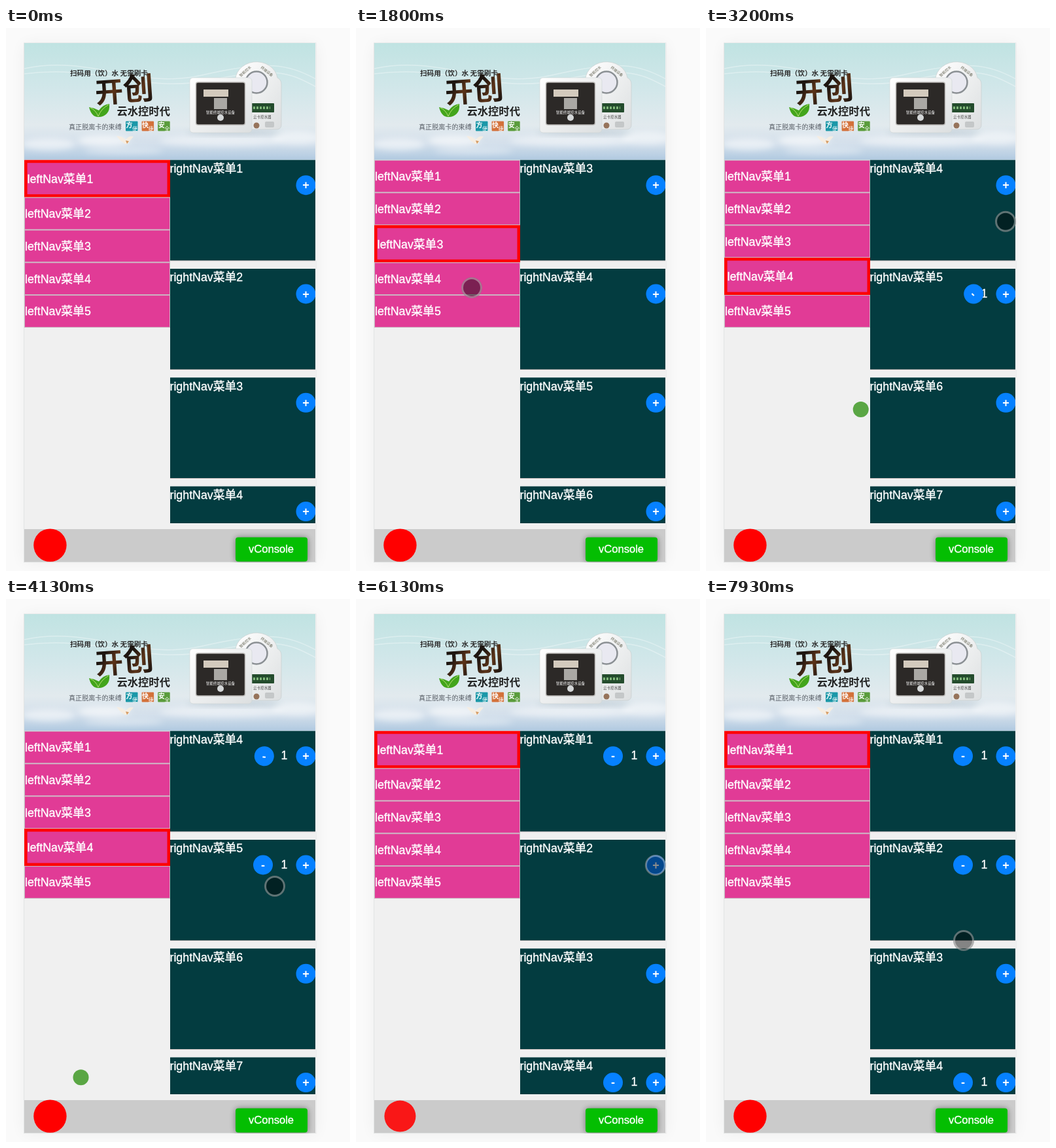
These frames come from a looping animation (526x830 px, 8000 ms). An HTML page:

```html
<!DOCTYPE html>
<html lang="zh-CN">
<head>
<meta charset="utf-8">
<title>Linked menu and cart</title>
<style>
html, body { margin: 0; width: 100%; height: 100%; overflow: hidden; background: #fafafa; }
svg { display: block; width: 526px; height: 830px; }
text { font-family: "Liberation Sans", "Noto Sans CJK SC", sans-serif; font-size: 17.8px; fill: #fff; }
.ui text { stroke: #fff; stroke-width: .35px; }
.ui .sign { font-weight: 700; font-size: 18px; stroke: none; }
.mid, .sign { text-anchor: middle; }
.ad text { font-family: "Noto Sans CJK SC", sans-serif; }
</style>
</head>
<body>
<svg viewBox="0 0 526 830">
  <defs>
    <linearGradient id="sky" x2="0" y2="1">
      <stop offset="0" stop-color="#c0e3e2"/>
      <stop offset=".4" stop-color="#d2e7ea"/>
      <stop offset=".7" stop-color="#e2eaee"/>
      <stop offset=".86" stop-color="#d3dfeb"/>
      <stop offset="1" stop-color="#b0c9e0"/>
    </linearGradient>
    <linearGradient id="ink" x2="1" y2="1">
      <stop offset=".35" stop-color="#1d1510"/>
      <stop offset=".6" stop-color="#5c3419"/>
      <stop offset=".85" stop-color="#1d1510"/>
    </linearGradient>
    <linearGradient id="shell" x2="1" y2="1">
      <stop offset="0" stop-color="#fff"/>
      <stop offset="1" stop-color="#dcdfe0"/>
    </linearGradient>
    <filter id="soft" x="-50%" y="-50%" width="200%" height="200%"><feGaussianBlur stdDeviation="5"/></filter>
    <filter id="halo" x="-20%" y="-20%" width="140%" height="140%"><feGaussianBlur stdDeviation="12"/></filter>
    <clipPath id="phone"><rect x="28" y="23" width="445" height="794"/></clipPath>
    <clipPath id="banner"><rect x="28" y="23" width="445" height="178.5"/></clipPath>
    <clipPath id="list"><rect x="251" y="201" width="222" height="556"/></clipPath>
  </defs>

  <rect width="526" height="830" fill="#fafafa"/>
  <rect x="28" y="25" width="446" height="792" fill="#000" opacity=".05" filter="url(#halo)"/>
  <rect x="27" y="22.5" width="447.5" height="794.5" fill="#e2e4e4"/>
  <rect x="28" y="23" width="446" height="793" fill="#f0f0f0"/>

  <g class="ad" clip-path="url(#banner)">
    <rect x="28" y="23" width="446" height="179" fill="url(#sky)"/>
    <g fill="none" stroke="#fff" stroke-width="1.5" opacity=".35">
      <path d="M28 62C130 40 200 95 300 72S430 55 474 78"/>
      <path d="M28 70C140 55 210 100 310 80S430 66 474 90"/>
    </g>
    <g fill="#fff" filter="url(#soft)">
      <ellipse cx="65" cy="178" rx="40" ry="9" opacity=".5"/>
      <ellipse cx="150" cy="172" rx="40" ry="8" opacity=".6"/>
      <ellipse cx="180" cy="188" rx="60" ry="6" opacity=".35"/>
      <ellipse cx="330" cy="172" rx="95" ry="9" opacity=".45"/>
      <ellipse cx="445" cy="168" rx="38" ry="10" opacity=".5"/>
    </g>
    <path d="M169 165q9 0 14 6q5-7 12-5q-5 5-8 10q-5 3-8-1q-5-3-10-10z" fill="#f5ede2"/>
    <path d="M183 172l5 1l-3 4z" fill="#d59a62"/>

    <text x="98" y="73" style="font-size:10.6px;font-weight:600;fill:#2b2b2b">扫码用（饮）水 无需刷卡</text>
    <g transform="rotate(-4 181 95)" style="font-weight:700">
      <text x="136" y="112" style="font-size:43px;fill:url(#ink)">开</text>
      <text x="179" y="111" style="font-size:47px;fill:url(#ink)">创</text>
    </g>
    <text x="169.500" y="133" style="font-size:16.3px;font-weight:600;fill:#222">云水控时代</text>
    <path d="M127 121q8 1 15 5q6-9 16-10q1 10-4 15q-5 5-12 5q-11 1-15-15z" fill="#43a51c"/>
    <path d="M129 122q8 3 12 13q4-11 16-18" fill="none" stroke="#b5dc74"/>
    <text x="96" y="155" style="font-size:10.1px;fill:#5a6068">真正脱离卡的束缚</text>
    <g id="tags"></g>

    <ellipse cx="348" cy="160" rx="72" ry="4" fill="#8296a3" opacity=".3" filter="url(#soft)"/>
    <path d="M351 155V84a32 28 0 0 1 64-8q6 3 6 10V148q0 6-6 7z" fill="url(#shell)" stroke="#c3c9ca" stroke-width=".6"/>
    <circle cx="383" cy="83" r="16.500" fill="#e9e9f1" stroke="#8b9094" stroke-width="2.500"/>
    <text transform="translate(359 75) rotate(-42)" style="font-size:5.500px;fill:#665">智能控水</text>
    <text transform="translate(389 61) rotate(38)" style="font-size:5.500px;fill:#665">终端设备</text>
    <rect x="374" y="115" width="36" height="14" rx="1" fill="#244c2d"/>
    <path d="M378 122h26" stroke="#7fb579" stroke-width="4" stroke-dasharray="3 2"/>
    <text x="378" y="138" style="font-size:5.500px;fill:#444">云卡控水器</text>
    <circle cx="383" cy="149" r="4.500" fill="#96735a"/>
    <rect x="396" y="143" width="14" height="9" rx="2" fill="#c4c7c8"/>
    <rect x="281" y="76" width="95" height="84" rx="5" fill="url(#shell)" stroke="#cfd3d4" stroke-width=".6"/>
    <rect x="290.500" y="83" width="75" height="65" rx="3" fill="#2c2927" stroke="#b9b7b4" stroke-width="1.500"/>
    <rect x="302" y="94" width="38" height="11" fill="#d3cabd"/>
    <rect x="318" y="107" width="20" height="17" fill="#aaa8a4"/>
    <text class="mid" x="328" y="131" style="font-size:5.500px">智能终端控水设备</text>
    <circle cx="328" cy="137" r="5" fill="#d5d7d8"/>
  </g>

  <g class="ui">
    <g id="left"></g>
    <g id="right" clip-path="url(#list)"></g>
    <rect x="28" y="766" width="445" height="50" fill="#cbcbcb"/>
    <circle id="cart" cx="67.400" cy="790.600" r="25.200" fill="red"/>
    <g clip-path="url(#phone)">
      <rect x="351" y="779" width="110" height="37" rx="4" fill="#000" opacity=".45" filter="url(#soft)"/>
    </g>
    <rect x="351" y="778.500" width="110" height="37" rx="4" fill="#04be02"/>
    <text class="mid" x="405.500" y="802" style="font-size:16.600px">vConsole</text>
    <g id="balls" clip-path="url(#phone)"></g>
  </g>
  <g id="touch">
    <circle r="16" fill="#000" fill-opacity=".45"/>
    <circle r="14.500" fill="none" stroke="#fff" stroke-opacity=".37" stroke-width="3"/>
  </g>
</svg>
<script>
const LOOP = 8000, TOP = 201.7, PITCH = 166.3, PLUS_X = 458.5, MINUS_X = 393, ROLL = 400;
const $ = id => document.getElementById(id);
const clamp = v => Math.min(1, Math.max(0, v));
const smooth = v => v * v * (3 - 2 * v);
const easeOut = v => 1 - (1 - v) ** 3;

function add(parent, tag, attrs = {}, label) {
  const node = document.createElementNS('http://www.w3.org/2000/svg', tag);
  set(node, attrs);
  if (label) node.textContent = label;
  return parent.appendChild(node);
}
function set(node, attrs) {
  for (const key in attrs) node.setAttribute(key, attrs[key]);
}
const show = (node, on) => set(node, { visibility: on ? 'inherit' : 'hidden' });

// item index, time added, time removed
const orders = [
  { item: 4, at: 2900 },
  { item: 3, at: 3742 },
  { item: 0, at: 5430 },
  { item: 1, at: 6270 },
  { item: 2, at: 6928, off: 7350 }
];

// start, length, scroll position before and after, easing
const scrolls = [
  [1250, 350, 0, 2, smooth],
  [1930, 300, 2, 3, smooth],
  [4190, 720, 3, 0, easeOut]
];

// time, x, y
const path = [
  [0, 555, 672], [70, 525, 655], [870, 193, 299], [930, 177, 301], [1030, 177, 301],
  [1180, 177, 331], [1330, 177, 331], [1780, 177, 397], [1960, 177, 397], [2650, 457, 406],
  [2940, 459, 406], [3200, 458, 296], [3400, 464, 244], [3600, 459, 240], [3790, 458, 240],
  [4130, 411, 439], [4190, 411, 441], [4480, 408, 640], [4640, 410, 640], [5200, 459, 267],
  [5330, 459, 241], [5500, 462, 241], [5980, 465, 400], [6100, 458, 407], [6340, 457, 407],
  [6720, 453, 572], [7000, 452, 577], [7060, 452, 577], [7260, 394, 573], [7430, 394, 573],
  [7860, 394, 522], [8000, 394, 522]
];

[['方', '便', '#1b98a8'], ['快', '捷', '#d3713a'], ['安', '全', '#5a9c3c']].forEach(([a, b, fill], i) => {
  const x = 183 + i * 24.6;
  add($('tags'), 'rect', { x, y: 142.5, width: 18.5, height: 15, rx: 1, fill });
  add($('tags'), 'text', { x: x + .5, y: 152, style: 'font-size:10px;font-weight:700' }, a);
  add($('tags'), 'text', { x: x + 10, y: 156.5, style: 'font-size:8px' }, b);
});

const navs = Array.from({ length: 5 }, (_, i) => {
  const g = add($('left'), 'g');
  return { g, box: add(g, 'rect', { fill: '#e13b96' }), label: add(g, 'text', {}, 'leftNav菜单' + (i + 1)) };
});

const button = (parent, sign) => {
  const g = add(parent, 'g');
  add(g, 'circle', { r: 15, fill: '#0681ff' });
  add(g, 'text', { class: 'sign', y: 6 }, sign);
  return g;
};

const items = Array.from({ length: 8 }, (_, i) => {
  const g = add($('right'), 'g');
  add(g, 'rect', { x: 251, width: 222, height: 154, fill: '#033c40' });
  add(g, 'rect', { x: 251, y: 153.8, width: 222, height: .8, fill: '#dcc4c4' });
  add(g, 'text', { x: 250.5, y: 19.3 }, 'rightNav菜单' + (i + 1));
  const count = add(g, 'text', { class: 'mid', x: 425.5, y: 43.5 }, '1');
  const minus = button(g, '-');
  set(button(g, '+'), { transform: `translate(${PLUS_X} 38.5)` });
  return { g, count, minus, order: orders.find(o => o.item === i) };
});

orders.forEach(o => { o.ball = add($('balls'), 'circle', { r: 12, fill: '#5aa644' }); });

function scrollAt(t) {
  let pos = 0;
  for (const [start, length, from, to, ease] of scrolls)
    if (t >= start) pos = from + (to - from) * ease(clamp((t - start) / length));
  return pos;
}

function touchAt(t) {
  const i = Math.max(1, path.findIndex(p => p[0] > t));
  const [t0, x0, y0] = path[i - 1], [t1, x1, y1] = path[i];
  const p = (t - t0) / (t1 - t0);
  return [x0 + (x1 - x0) * p, y0 + (y1 - y0) * p];
}

function drawLeft(pos) {
  const current = Math.floor(pos + .05);
  let y = TOP;
  navs.forEach(({ g, box, label }, i) => {
    const on = i === current, h = on ? 57 : 49.8, b = on ? 4.5 : 1;
    set(g, { transform: `translate(28 ${y})` });
    set(box, { x: b / 2, y: b / 2, width: 223 - b, height: h - b, stroke: on ? 'red' : '#c8b4c0', 'stroke-width': b });
    set(label, { x: on ? 4.5 : 1, y: on ? 35.3 : 31.3 });
    y += h;
  });
}

function drawRight(t, pos) {
  items.forEach(({ g, count, minus, order }, i) => {
    set(g, { transform: `translate(0 ${TOP + PITCH * (i - pos)})` });
    const { at = Infinity, off = Infinity } = order || {};
    const out = t < off ? clamp((t - at) / ROLL) : 1 - clamp((t - off) / ROLL);
    show(count, t >= at && t < off);
    show(minus, out > 0);
    set(minus, { transform: `translate(${PLUS_X + (MINUS_X - PLUS_X) * out} 38.5) rotate(${180 * (1 - out)})` });
  });
}

function drawCart(t) {
  let scale = 1, alpha = 1;
  for (const { item, at, ball } of orders) {
    const age = t - at, p = clamp((age - 133) / 301);
    const fall = Math.max(0, p + 2.37 * p * (1 - p) * (p - .769));
    const y0 = TOP + PITCH * (item - scrollAt(at)) + 48;
    show(ball, age > 50 && p < 1);
    set(ball, { cx: 470 - 418 * p, cy: y0 + (800 - y0) * fall });

    const u = (age - 450) / 400;
    if (u > 0 && u < 1) {
      const wave = Math.sin(2 * Math.PI * u);
      scale = 1 + .065 * wave;
      alpha = 1 + .16 * Math.min(0, wave);
    }
  }
  set($('cart'), { r: 25.2 * scale, opacity: alpha });
}

function frame(now) {
  const t = now % LOOP, pos = scrollAt(t);
  drawLeft(pos);
  drawRight(t, pos);
  drawCart(t);
  set($('touch'), { transform: `translate(${touchAt(t)})` });
  requestAnimationFrame(frame);
}
frame(performance.now());
</script>
</body>
</html>
```
